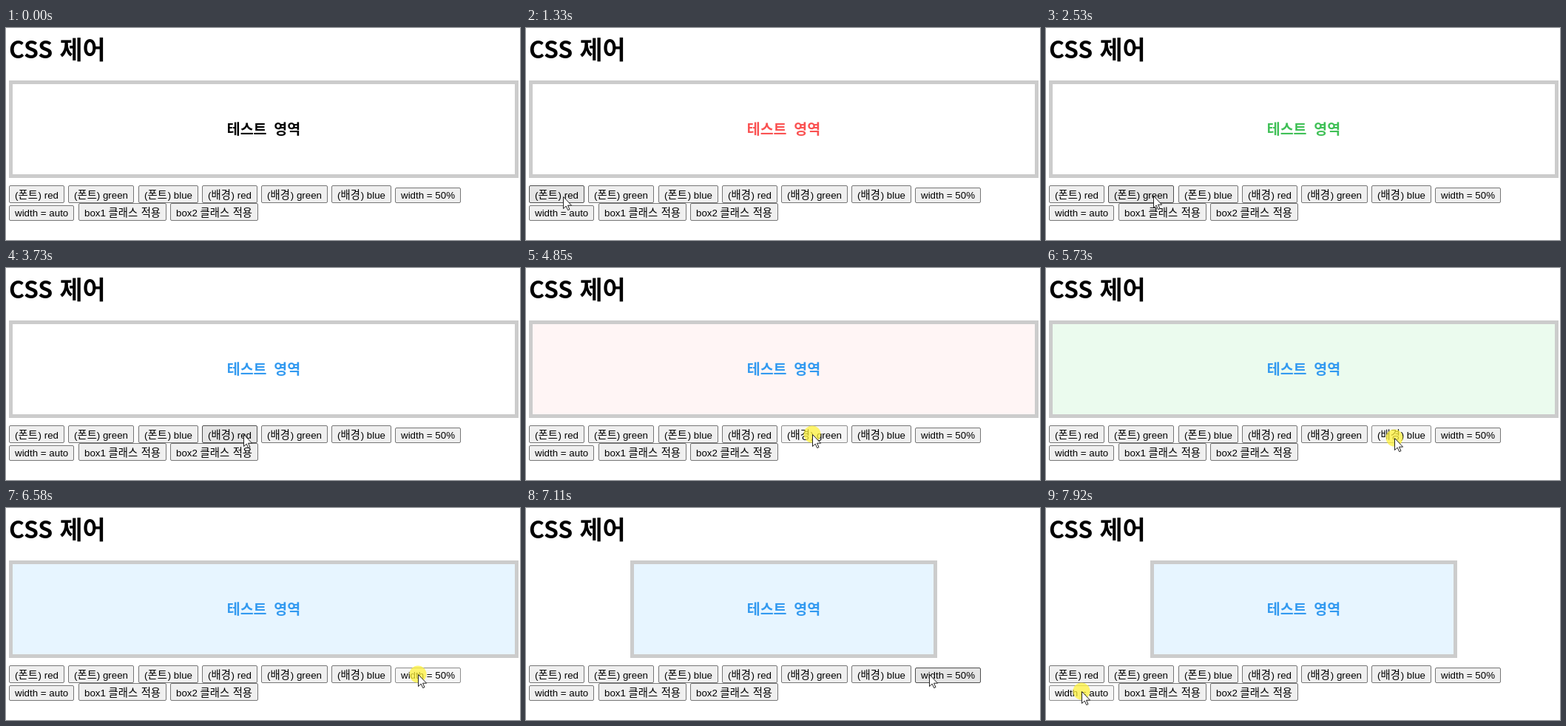
These frames come from a looping animation (695 by 287 pixels, 8 s). An HTML page:

```html
<!DOCTYPE html>
<html lang="ko">
<head>
<meta charset="utf-8">
<title>CSS 제어</title>
<style>
  html, body { margin: 0; width: 100%; height: 100%; overflow: hidden; background: #fff; }
  svg { display: block; width: 695px; height: 287px; }
  text { font: 13.333px "Liberation Sans", Arial, sans-serif; white-space: pre; }
  .ko { font: 14.3px "Noto Sans CJK KR", "Noto Sans CJK", sans-serif; }
  .head { font: bold 32px "Noto Sans CJK KR", "Noto Sans CJK", sans-serif; }
  .end { text-anchor: end; }
</style>
</head>
<body>
<svg id="stage" viewBox="0 0 695 287"></svg>
<script>
const LOOP = 8000;
const stage = document.getElementById('stage');

function add(tag, attrs, text = '') {
  const el = document.createElementNS('http://www.w3.org/2000/svg', tag);
  set(el, attrs);
  el.textContent = text;
  return stage.appendChild(el);
}
function set(el, attrs) {
  for (const k in attrs) el.setAttribute(k, attrs[k]);
}

add('text', { x: 4, y: 41, class: 'head' }, 'CSS');
add('text', { x: 72.5, y: 41.5, class: 'head', style: 'font-size:33.8px' }, '제어');

const box = add('rect', { y: 73.5, height: 127, stroke: '#ccc', 'stroke-width': 5 });
const words = [[298.7, '테스트'], [362.2, '영역']].map(([x, s]) =>
  add('text', { x, y: 144.3, class: 'head', style: 'font-size:19.5px' }, s));

// Buttons: left, top, right, bottom, then label
function button(x, y, x2, y2, label) {
  const face = add('rect', { x: x + .5, y: y + .5, width: x2 - x - 1, height: y2 - y - 1, rx: 1.5 });
  const base = y2 - 6;
  const left = (dx, s, cls = '') => add('text', { x: x + dx, y: base, class: cls }, s);
  const right = (s, cls = '') => add('text', { x: x2 - 8, y: base, class: 'end ' + cls }, s);
  const font = label.match(/^\((.+)(\) .+)$/);
  if (font) {
    left(8, '(');
    left(12.6, font[1], 'ko');
    right(font[2]);
  } else if (label.startsWith('box')) {
    const [name, a, b] = label.split(' ');
    left(8, name);
    left(40.6, a, 'ko');
    right(b, 'ko');
  } else {
    left(8, label);
  }
  return { x, y, x2, y2, face };
}

const buttons = [
  [4, 213, 79, 237, '(폰트) red'],
  [84, 213, 173, 237, '(폰트) green'],
  [179, 213, 260, 237, '(폰트) blue'],
  [265, 213, 340, 237, '(배경) red'],
  [345, 213, 435, 237, '(배경) green'],
  [440, 213, 521, 237, '(배경) blue'],
  [526, 216, 615, 237, 'width = 50%'],
  [4, 240, 92, 261, 'width = auto'],
  [98, 237, 217, 261, 'box1 클래스 적용'],
  [222, 237, 341, 261, 'box2 클래스 적용']
].map(b => button(...b));

const spot = add('circle', { r: 11.5, fill: '#fff23c', opacity: .75 });
const arrow = add('path', {
  d: 'M.5.5V16.6L4.2 13.1L6.7 18.6L9 17.6L6.5 12.2H11.6Z',
  fill: '#fff', stroke: '#222', 'stroke-width': 1
});

// Cursor moves: start, end, number of steps, target x, y
const moves = [
  [720, 930, 4, 50, 228],
  [1660, 1800, 3, 137, 227],
  [2530, 2800, 5, 226, 226],
  [3400, 3730, 6, 321, 225],
  [4390, 4520, 3, 387, 225],
  [5120, 5530, 7, 471, 230],
  [6050, 6380, 5, 557, 225],
  [7040, 7780, 10, 50, 244],
  [7850, 7850, 1, 48, 248]
];

// Clicks: press, effect, release, changed state
const clicks = [
  [1200, 1330, 1330, { color: '#fa5252' }],
  [2140, 2270, 2270, { color: '#40c057' }],
  [3130, 3260, 3260, { color: '#339af0' }],
  [3930, 4060, 4060, { fill: '#fff5f5' }],
  [4850, 4910, 4980, { fill: '#ebfbee' }],
  [5730, 5790, 5850, { fill: '#e7f5ff' }],
  [6580, 6640, 6710, { x: 141, width: 415 }],
  [7920, LOOP, LOOP, {}]
];

const ease = p => (1 - Math.cos(Math.PI * p)) / 2;

function cursorAt(t) {
  let x = 82, y = 290;
  for (const [from, to, n, tx, ty] of moves) {
    if (t < from) break;
    const gap = (to - from) / (n - 1 || 1);
    const step = gap ? Math.min(n, Math.floor((t - from) / gap + 1e-6) + 1) : n;
    const k = ease(step / n);
    x += (tx - x) * k;
    y += (ty - y) * k;
  }
  return [x, y];
}

function render(t) {
  const state = { color: '#000', fill: '#fff', x: 4, width: 689 };
  let pressed = false;
  for (const [down, act, up, change] of clicks) {
    if (t >= act) Object.assign(state, change);
    if (t >= down && t < up) pressed = true;
  }
  set(box, { x: state.x + 2.5, width: state.width - 5, fill: state.fill });
  words.forEach(w => set(w, { fill: state.color }));

  const [x, y] = cursorAt(t);
  const shown = t >= 720;
  for (const b of buttons) {
    const over = shown && x >= b.x && x < b.x2 && y >= b.y && y < b.y2;
    const [fill, stroke] = !over ? ['#efefef', '#767676']
      : pressed ? ['#f5f5f5', '#8d8d8d'] : ['#e5e5e5', '#4f4f4f'];
    set(b.face, { fill, stroke });
  }
  set(arrow, {
    transform: `translate(${Math.round(x)} ${Math.round(y)})`,
    visibility: shown ? 'visible' : 'hidden'
  });
  set(spot, { cx: x, cy: y, visibility: pressed ? 'visible' : 'hidden' });
}

const start = performance.now();
function tick() {
  render((performance.now() - start) % LOOP);
  requestAnimationFrame(tick);
}
tick();
</script>
</body>
</html>
```
